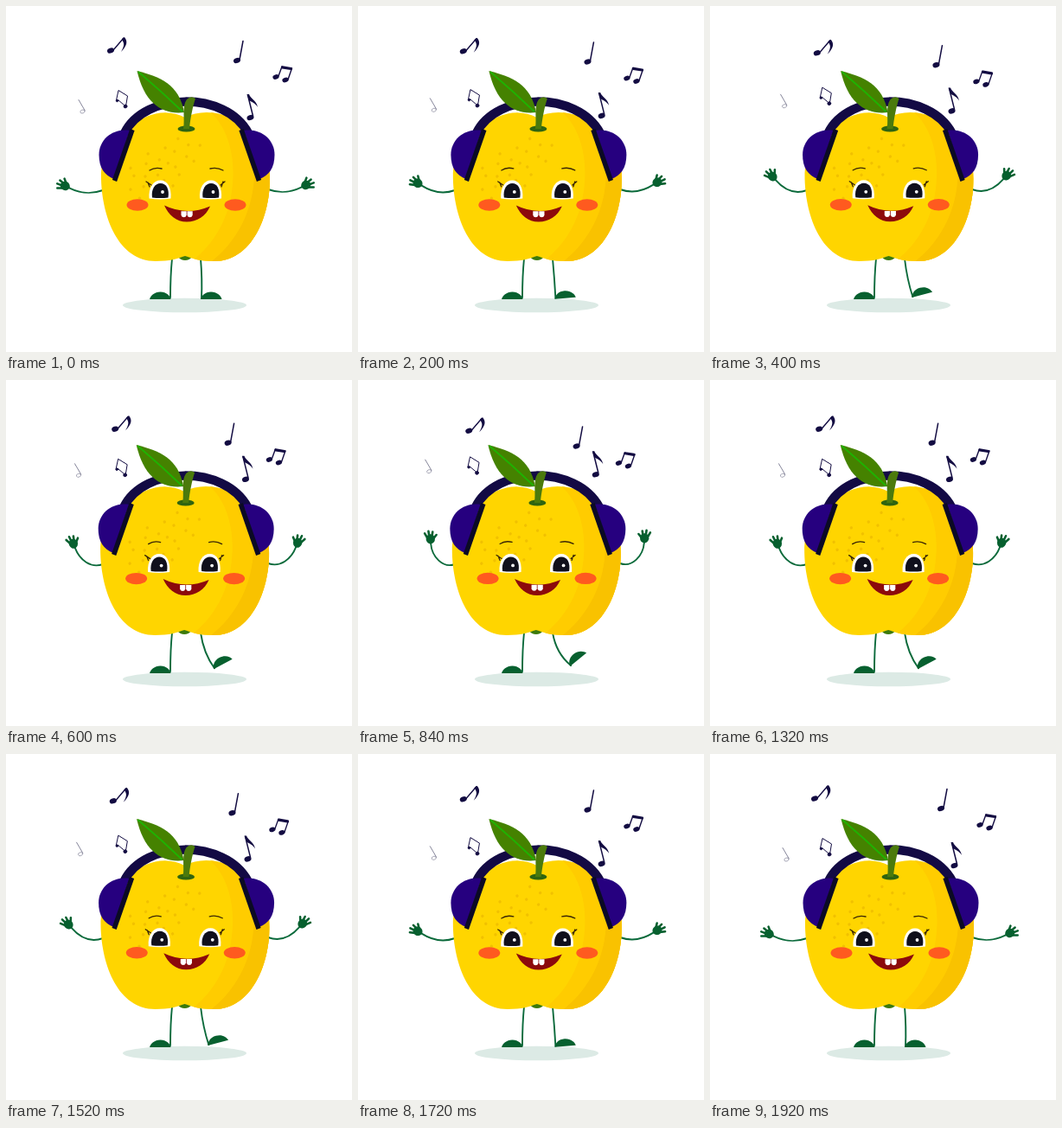
Write an HTML page that moves like this. It is 400 px wide and 400 px high and loops after 2000 ms.

```html
<!DOCTYPE html>
<html lang="en">
<head>
<meta charset="utf-8">
<title>Dancing fruit</title>
<style>
  html, body { margin: 0; width: 100%; height: 100%; overflow: hidden; background: #fff; }
  svg { display: block; width: 100vw; height: 100vh; }
  .limb { fill: none; stroke: #0b6a3b; stroke-width: 1.9; stroke-linecap: round; }
  .green { fill: #07602f; }
  .fingers { fill: none; stroke: #07602f; stroke-width: 2.3; stroke-linecap: round; }
  .ink { fill: #130c42; }
  .line { fill: none; stroke: #130c42; stroke-linecap: round; stroke-linejoin: round; }
  .lash { fill: none; stroke: #3a2605; stroke-width: 1.3; stroke-linecap: round; }
  .thin { fill: none; stroke: #85859a; stroke-linecap: round; }
</style>
</head>
<body>
<svg viewBox="0 0 400 400" xmlns="http://www.w3.org/2000/svg">
  <defs>
    <path id="skin" d="M207 129C194 122 178 121 162 128C130 142 109 162 110 200C111 244 130 295 173 295C190 295 198 292 207 289C216 292 224 295 241 295C284 295 305 244 305 200C305 162 286 140 254 127C237 121 220 122 207 129Z"/>
    <clipPath id="inside"><use href="#skin"/></clipPath>
    <g id="hand" transform="scale(1.12)">
      <ellipse class="green" cy="-4.8" rx="4.6" ry="5"/>
      <path class="fingers" d="M-3 -6L-5.5 -11M-1 -7L-1.5 -13M1.6 -7L2.8 -12M3 -5L6.4 -8.6"/>
    </g>
    <path id="foot" class="green" d="M0 0C1 -4 5 -8.5 12 -8.5C19 -8.5 23.5 -4 24.5 0Z"/>
    <g id="cup">
      <path fill="#26007f" d="M143 144C124 141 107.5 154 107.5 172C107.5 187 114 196 125 200Z"/>
      <path fill="none" stroke="#0b0a24" stroke-width="5.5" d="M146 143L125.5 202"/>
    </g>
    <g id="eye">
      <path fill="#fff" d="M-13 9C-14 -4 -8 -12 0 -12C8 -12 13 -4 12 9Q0 11 -13 9Z"/>
      <path fill="#10101c" d="M-9.5 8C-11 -2 -6 -8.5 0 -8.5C7 -8.5 10.5 -2 9 8Q0 9 -9.5 8Z"/>
      <circle cx="2.5" cy="1.5" r="1.9" fill="#fff"/>
    </g>
    <ellipse id="head" rx="4.1" ry="3" transform="rotate(-20)"/>
    <path id="tooth" fill="#fff" d="M0 0H6.2V4.5Q5.5 7 3.1 7Q.7 7 0 4.5Z"/>
  </defs>

  <ellipse cx="206.5" cy="346" rx="71.5" ry="8.3" fill="#dceae5"/>

  <path class="limb" d="M192 292Q190 312 190 337"/>
  <path id="leg" class="limb"/>
  <use href="#foot" transform="translate(190.5 339) scale(-1 1)"/>
  <use id="step" href="#foot"/>
  <path id="armL" class="limb"/>
  <path id="armR" class="limb"/>
  <use id="handL" href="#hand"/>
  <use id="handR" href="#hand"/>

  <g data-drift="-1.2 0">
    <path fill="#3c7a0c" d="M199 290Q207 287 215 290Q212 294 207 294Q202 294 199 290Z"/>
    <use href="#skin" fill="#ffd500"/>
    <g clip-path="url(#inside)">
      <path fill="#ffcc00" d="M233 120C256 138 265 172 262 205C259 245 240 277 212 297H310V115Z"/>
      <path fill="#f9c200" d="M268 124C286 152 290 187 285 215C279 250 260 279 234 298H310V120Z"/>
    </g>
    <g id="dots" fill="#f1c100"></g>
    <path fill="none" stroke="#130a44" stroke-width="10.5" d="M137 147C160 99 254 98 280 147"/>
    <use href="#cup"/>
    <use href="#cup" transform="translate(418 0) scale(-1 1)"/>
    <ellipse cx="208.500" cy="142" rx="10" ry="3.600" fill="#2f6410"/>
    <path fill="#4b7a0c" d="M205 142C207 130 203 116 209 108Q214 103 219 107C216 116 213 130 212 142Z"/>
    <path fill="#458200" d="M151.500 75C178 82 200 90 206 123C180 126 160 112 151.500 75Z"/>
    <path fill="none" stroke="#1eb300" stroke-width="1.800" d="M153 76Q180 99 204 122"/>
  </g>

  <g data-drift="-2 -.6">
    <ellipse cx="152" cy="230" rx="12.5" ry="6.7" fill="#ff5a1f"/>
    <ellipse cx="265" cy="230" rx="12.5" ry="6.7" fill="#ff5a1f"/>
    <use href="#eye" transform="translate(178.5 213.5)"/>
    <use href="#eye" transform="translate(237 213.5)"/>
    <path class="lash" d="M166 190Q172 186 180 188M236 188Q244 186 251 190M168 207L162 203M166 209L164 204M248 207L253 203M249 209L251 203"/>
    <path fill="#8c0a0c" d="M183 230.5Q209 243 236 231.5C231 243 221 249.5 209 249.5C197 249.5 188 242 183 230.5Z"/>
    <use href="#tooth" x="202.500" y="237.300"/>
    <use href="#tooth" x="209.500" y="237.300"/>
  </g>

  <g data-drift="7.5 7.5">
    <use href="#head" class="ink" x="0" transform="translate(121 51.5)"/>
    <path class="line" stroke-width="1.4" d="M124 51L136 37"/>
    <path class="ink" d="M134 38L137 36C141 41 140 46 133 53C137 46 137 43 134 39Z"/>
  </g>
  <g data-drift="-15 14">
    <use href="#head" class="ink" transform="translate(267 63)"/>
    <path class="line" stroke-width="1.5" d="M270 62L274 40.5"/>
  </g>
  <g data-drift="-11 14.5">
    <use href="#head" class="ink" transform="translate(312 82) scale(.9)"/>
    <use href="#head" class="ink" transform="translate(323 85.5) scale(.9)"/>
    <path class="line" stroke-width="1.4" d="M315 81L319 70M326 85L330.5 72"/>
    <path class="line" stroke-width="3.2" d="M319.5 70.8L329.5 72.5"/>
  </g>
  <g data-drift="-8 -20.5">
    <use href="#head" class="ink" transform="translate(282.5 129)"/>
    <path class="line" stroke-width="1.5" d="M285.5 127L279.5 103"/>
    <path class="ink" d="M278.5 102L281 102C283 108 289 108 291 117C288 112 284 111 281 109Z"/>
  </g>
  <g data-drift="-.5 -9" class="line" stroke-width="1">
    <path d="M127.5 109L130 97.5L140.5 104L138.500 116M129.500 108.500L136 114"/>
    <circle class="ink" cx="128.500" cy="109.500" r="1.200"/>
    <circle class="ink" cx="138" cy="116" r="1.900"/>
  </g>
  <g data-drift="-6.5 -17" class="thin">
    <path d="M84 108.500L91 120.500"/>
    <use href="#head" transform="translate(88.500 122) scale(.65)"/>
  </g>
</svg>
<script>
const HALF = 960, STEP = 40, LOOP = 2000, RAD = Math.PI / 180;
const el = id => document.getElementById(id);
const mix = (a, b, p) => a + (b - a) * p;
const drifters = [...document.querySelectorAll("[data-drift]")];

// Freckles: a golden-angle spiral squeezed into a tilted oval.
function freckles(count) {
  let marks = "";
  for (let i = 0; i < count; i++) {
    const a = i * 2.4, r = Math.sqrt((i + 0.5) / count);
    marks += `<circle cx="${52 * r * Math.cos(a)}" cy="${27 * r * Math.sin(a)}" r="1.7"/>`;
  }
  el("dots").innerHTML = marks;
  el("dots").setAttribute("transform", "translate(181 186) rotate(-34)");
}

function place(node, x, y, turn = 0, flip = 1) {
  node.setAttribute("transform", `translate(${x} ${y}) rotate(${turn}) scale(${flip} 1)`);
}

// The wrist swings about the shoulder; the forearm runs in line with the hand.
function arm(name, x, y, side, p) {
  const lift = mix(4, 42, p) * RAD, reach = mix(39, 36.5, p), tilt = mix(64, 2, p);
  const wx = x + side * reach * Math.cos(lift), wy = y - reach * Math.sin(lift);
  const ex = wx - side * 15 * Math.sin(tilt * RAD), ey = wy + 15 * Math.cos(tilt * RAD);
  el("arm" + name).setAttribute("d", `M${x} ${y}C${x + side * 14} ${y + 5} ${ex} ${ey} ${wx} ${wy}`);
  place(el("hand" + name), wx, wy, side * tilt, -side);
}

function leg(p) {
  const x = 225, y = 292, swing = 29 * p * RAD, length = mix(46, 43, p);
  const fx = x + 1 + length * Math.sin(swing), fy = y + length * Math.cos(swing);
  el("leg").setAttribute("d", `M${x} ${y}Q${x + 2 + 2 * p} ${y + 24} ${fx} ${fy}`);
  place(el("step"), fx - 1, fy + 1, -41 * p);
}

function draw(t) {
  const p = (1 - Math.cos(Math.PI * t / HALF)) / 2;
  arm("L", 112, 213, -1, p);
  arm("R", 303, 212, 1, p);
  leg(p);
  for (const node of drifters) {
    const [dx, dy] = node.dataset.drift.split(" ");
    place(node, dx * p, dy * p);
  }
}

freckles(23);
const start = performance.now();
function tick() {
  const t = (performance.now() - start) % LOOP;
  draw(Math.min(Math.floor(t / STEP) * STEP, 2 * HALF));
  requestAnimationFrame(tick);
}
tick();
</script>
</body>
</html>
```
